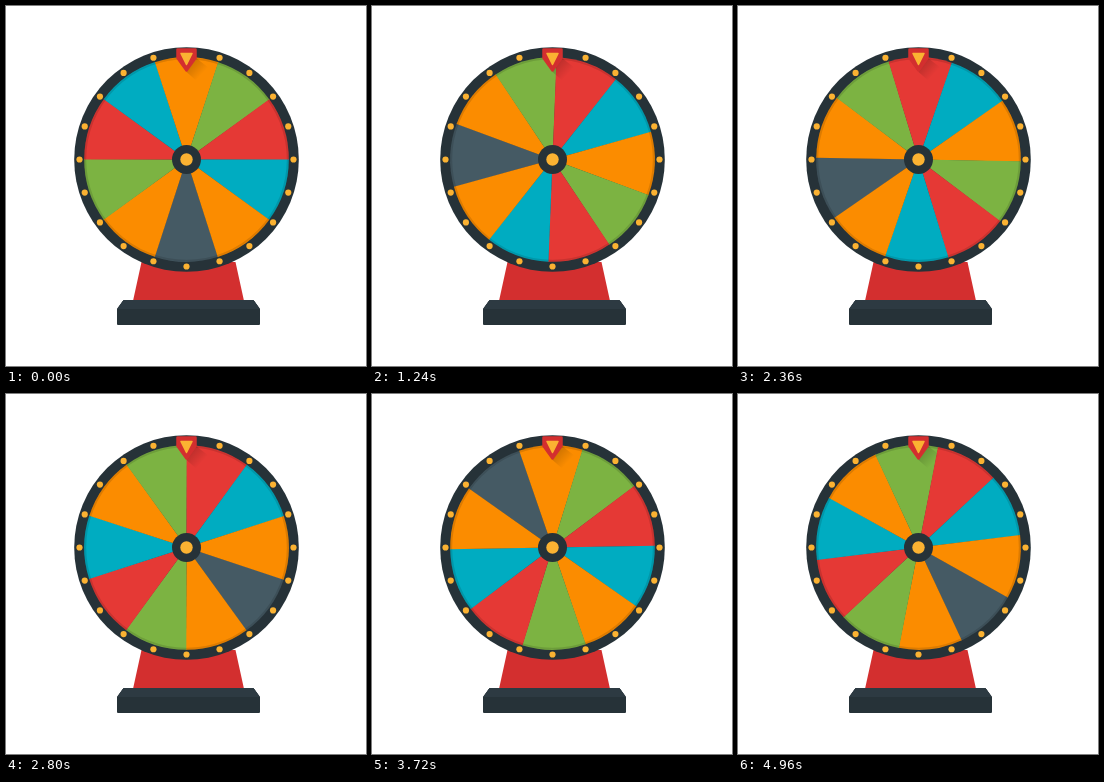
Animation, 360 px wide and 360 px high, one loop 5 s. Source, as an HTML page with a canvas:

```html
<!DOCTYPE html>
<html lang="en">
<head>
<meta charset="utf-8">
<title>Prize wheel</title>
<style>
  html, body { margin: 0; width: 100%; height: 100%; overflow: hidden; background: #fff; }
  canvas { display: block; }
</style>
</head>
<body>
<canvas id="stage" width="360" height="360"></canvas>
<script>
const ctx = document.getElementById('stage').getContext('2d');
const LOOP = 5000, STEP = 40;
const CX = 180.5, CY = 153.5, RIM = 112.3, FACE = 102.3;
const DARK = '#263238', GOLD = '#fbb232', RED = '#d32f2f';
const ORANGE = '#fb8c00', GREEN = '#7cb342', CRIMSON = '#e53935', BLUE = '#00acc1', SLATE = '#455a64';
const SECTORS = [SLATE, ORANGE, GREEN, CRIMSON, BLUE, ORANGE, GREEN, CRIMSON, BLUE, ORANGE];

// Spin curve: [step, degrees turned, degrees per step]
const SPIN = [
  [0, 0, 0], [19, 31.5, 3.5], [43, 198, 11], [59, 433, 18.3],
  [81, 935.5, 24.9], [105, 1471.5, 18.4], [124, 1757, 11.4]
];

// Cubic Hermite interpolation of the spin curve
function spinAngle(step) {
  const i = Math.max(1, SPIN.findIndex(key => key[0] >= step));
  const [n0, a0, v0] = SPIN[i - 1], [n1, a1, v1] = SPIN[i];
  const span = n1 - n0, u = (step - n0) / span, w = 1 - u;
  return a0 * w * w * (1 + 2 * u) + a1 * u * u * (3 - 2 * u) +
    span * u * w * (v0 * w - v1 * u);
}

function disc(x, y, r, color) {
  ctx.beginPath();
  ctx.arc(x, y, r, 0, 2 * Math.PI);
  ctx.fillStyle = color;
  ctx.fill();
}

function shape(points, color, round = 0) {
  ctx.beginPath();
  points.forEach(([x, y]) => ctx.lineTo(x, y));
  ctx.closePath();
  ctx.fillStyle = ctx.strokeStyle = color;
  ctx.fill();
  if (round) {
    ctx.lineWidth = round;
    ctx.lineJoin = 'round';
    ctx.stroke();
  }
}

function drawStand() {
  shape([[135.5, 256], [229.5, 256], [238, 295], [127, 295]], RED);
  shape([[118, 295], [247, 295], [253, 303], [253, 318], [112, 318], [112, 303]], DARK, 2);
  shape([[117.5, 294.5], [247.5, 294.5], [253, 302.5], [112, 302.5]], '#2d3a42', 1);
}

function drawSectors(degrees) {
  const slice = 2 * Math.PI / SECTORS.length;
  const start = (degrees + 90) * Math.PI / 180 - slice / 2;
  SECTORS.forEach((color, i) => {
    ctx.beginPath();
    ctx.moveTo(CX, CY);
    ctx.arc(CX, CY, FACE, start + i * slice, start + (i + 1) * slice + 0.004);
    ctx.fillStyle = color;
    ctx.fill();
  });
  ctx.beginPath();
  ctx.arc(CX, CY, FACE - 1, 0, 2 * Math.PI);
  ctx.strokeStyle = 'rgba(0,0,0,.12)';
  ctx.lineWidth = 2;
  ctx.stroke();
}

function drawPin() {
  const shade = ctx.createLinearGradient(183, 54, 197, 67);
  shade.addColorStop(0, 'rgba(0,0,0,.22)');
  shade.addColorStop(1, 'rgba(0,0,0,0)');
  shape([[190, 52], [203, 62], [193, 77], [180.5, 66]], shade);
  shape([[171.5, 43.5], [189.5, 43.5], [189.5, 52], [180.5, 64.5], [171.5, 52]], RED, 2.5);
  shape([[175, 47.5], [186, 47.5], [180.5, 58.5]], GOLD, 1.5);
}

function draw(step) {
  ctx.fillStyle = '#fff';
  ctx.fillRect(0, 0, 360, 360);
  drawStand();
  disc(CX, CY, RIM, DARK);
  drawSectors(spinAngle(step));
  for (let i = 0; i < 20; i++) {
    const a = i * Math.PI / 10;
    disc(CX + 107 * Math.cos(a), CY + 107 * Math.sin(a), 3.1, GOLD);
  }
  disc(CX, CY, 14.5, DARK);
  disc(CX, CY, 6.2, GOLD);
  drawPin();
}

const began = performance.now();
function tick() {
  draw(Math.floor((performance.now() - began) % LOOP / STEP));
  requestAnimationFrame(tick);
}
tick();
</script>
</body>
</html>
```
